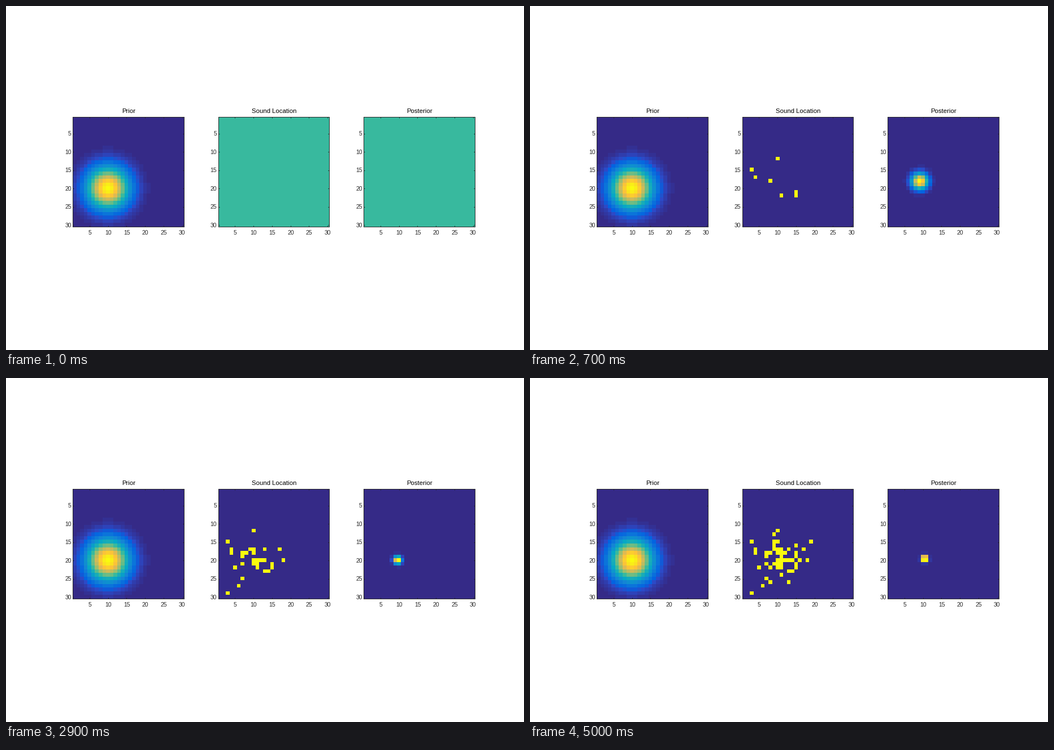
Recreate the animation shown at these times as a matplotlib script. Size 917x611 px, loop 5100 ms.

```python
import numpy as np
import matplotlib.pyplot as plt
from matplotlib.animation import FuncAnimation
from matplotlib.colors import LinearSegmentedColormap

W, H, DPI = 917, 611, 100
N = 30
VAR = 15
PRIOR_MEAN = (10, 20)
FRAMES = 51
INK = "#262626"

plt.rcParams["font.family"] = ["Liberation Sans", "DejaVu Sans"]

# Key colours of the 64-level blue-green-yellow map
STOPS = {0: "#352a87", 5: "#2c4ac7", 8: "#0363e1", 16: "#1485d4",
         24: "#06a7c6", 32: "#38b99e", 40: "#92bf73", 48: "#d9ba56",
         53: "#fdbe3d", 56: "#fcce2e", 63: "#f9fb0e"}
CMAP = LinearSegmentedColormap.from_list(
    "heat", [(k / 63, c) for k, c in STOPS.items()], N=64)

cols, rows = np.meshgrid(np.arange(1, N + 1), np.arange(1, N + 1))


def make_sounds():
    """Opening sounds as (column, row), then random groups around drifting centres."""
    opening = [(10, 12), (8, 18), (15, 21), (3, 15), (11, 22), (4, 17),
               (15, 22), (4, 18), (5, 22), (7, 21), (9, 17), (10, 20),
               (13, 17), (3, 29), (11, 21)]
    groups = [np.array(opening) - (.25, 0)]
    rng = np.random.default_rng(4)
    for size, centre in ((8, (10.5, 20)), (12, (12, 21.8)), (15, (11.55, 17.65))):
        spread = rng.normal(0, 3.3, (size, 2))
        groups.append(spread - spread.mean(axis=0) + centre)
    return np.vstack(groups)


SOUNDS = make_sounds()


def bump(mean, var):
    """Gaussian on the grid, scaled so its highest cell is 1."""
    d2 = (cols - mean[0]) ** 2 + (rows - mean[1]) ** 2
    return np.exp((d2.min() - d2) / (2 * var))


def heard(n):
    grid = np.zeros((N, N))
    cells = np.clip(np.rint(SOUNDS[:n]).astype(int), 1, N) - 1
    grid[cells[:, 1], cells[:, 0]] = 1
    return grid


def posterior(n):
    return bump(SOUNDS[:n].mean(axis=0), VAR / n)


fig = plt.figure(figsize=(W / DPI, H / DPI), dpi=DPI, facecolor="white")

LEFT, PITCH, TOP = 118.45, 257.5, 197.4
SIDE_W, SIDE_H = 196.5, 195.05
TICKS = range(5, N + 1, 5)


def put(x, y, text, px, ha, color):
    fig.text(x / W, 1 - y / H, text, fontsize=px * 72 / DPI, ha=ha,
             va="baseline", color=color)


def panel(index, title, data):
    left = LEFT + index * PITCH
    ax = fig.add_axes([left / W, 1 - (TOP + SIDE_H) / H, SIDE_W / W, SIDE_H / H])
    img = ax.imshow(data, cmap=CMAP, vmin=0, vmax=1, aspect="auto",
                    interpolation="nearest", extent=(.5, N + .5, N + .5, .5))
    ax.set_xticks(TICKS)
    ax.set_yticks(TICKS)
    ax.tick_params(direction="in", length=1.44, width=.7, color=INK, top=True,
                   right=True, labelbottom=False, labelleft=False)
    for spine in ax.spines.values():
        spine.set(linewidth=.7, edgecolor=INK)
    put(left + SIDE_W / 2, 190.4, title, 11.4, "center", "black")
    for t in TICKS:
        f = (t - .5) / N
        put(left + f * SIDE_W + .2, 406, str(t), 10.4, "center", INK)
        put(left - 2.7, TOP + f * SIDE_H + 3.8, str(t), 10.4, "right", INK)
    return img


flat = np.full((N, N), .5)
panel(0, "Prior", bump(PRIOR_MEAN, VAR))
sound_img = panel(1, "Sound Location", flat)
post_img = panel(2, "Posterior", flat)


def draw(i):
    sound_img.set_data(heard(i) if i else flat)
    post_img.set_data(posterior(i) if i else flat)
    return sound_img, post_img


anim = FuncAnimation(fig, draw, frames=FRAMES, init_func=lambda: draw(0),
                     interval=100, repeat=True, repeat_delay=0, blit=False)
plt.show()
```
